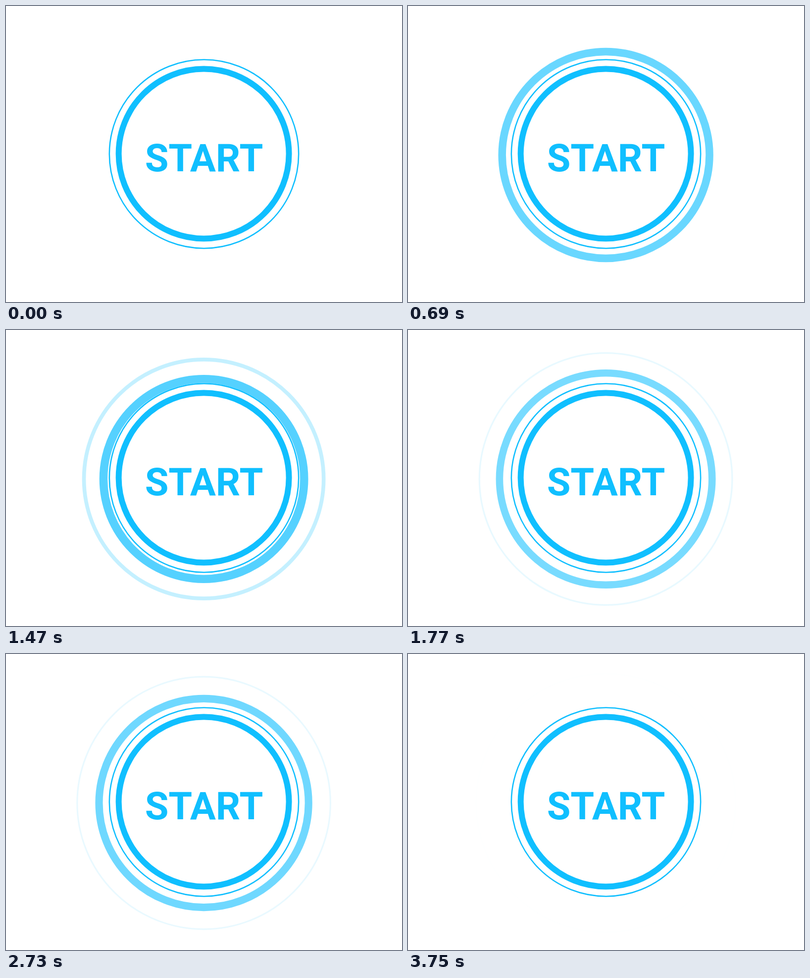
An HTML page without scripts for the animation above (4320 ms loop, 800 px wide and 600 px high).

```html
<!DOCTYPE html>
<html lang="en">
<head>
<meta charset="utf-8">
<title>Start button</title>
<style>
  /* Progress of one ripple, 0 to 1; every ripple property follows from it. */
  @property --p { syntax: "<number>"; inherits: false; initial-value: 1; }

  html, body { margin: 0; width: 100%; height: 100%; overflow: hidden; background: #fff; }
  svg { display: block; width: 800px; height: 600px; }

  .ripple {
    --width: calc(18px * (1 - var(--p) * var(--p)));
    r: calc(189.4px + 74.8px * var(--p) - var(--width) / 2);
    stroke-width: var(--width);
    opacity: calc(1 - var(--p));
    fill: none;
    stroke: #10bfff;
    animation: 4320ms linear infinite;
  }
  .first { animation-name: first; }
  .second { animation-name: second; }
  .third { animation-name: third; }

  @keyframes first {
    0% { --p: 0; }
    16% { --p: .372; }
    45.5%, 100% { --p: 1; }
  }
  @keyframes second {
    0%, 20.49% { --p: 1; }
    20.5% { --p: 0; }
    67.5%, 100% { --p: 1; }
  }
  @keyframes third {
    0%, 46.99% { --p: 1; }
    47% { --p: 0; }
    86.8%, 100% { --p: .978; }
  }

  .button { fill: #fff; stroke: #10bfff; }
  .label {
    font: 600 77.5px Roboto, "Open Sans", sans-serif;
    font-stretch: 75%;
    text-anchor: middle;
    fill: #10bfff;
  }
</style>
</head>
<body>
<svg viewBox="0 0 800 600">
  <circle class="ripple first" cx="399.6" cy="302"/>
  <circle class="ripple second" cx="399.6" cy="302"/>
  <circle class="ripple third" cx="399.6" cy="302"/>
  <circle class="button" cx="400" cy="300" r="191.2" stroke-width="2.6"/>
  <circle class="button" cx="399.6" cy="299.5" r="172" stroke-width="12"/>
  <text class="label" x="400" y="335">START</text>
</svg>
</body>
</html>
```
